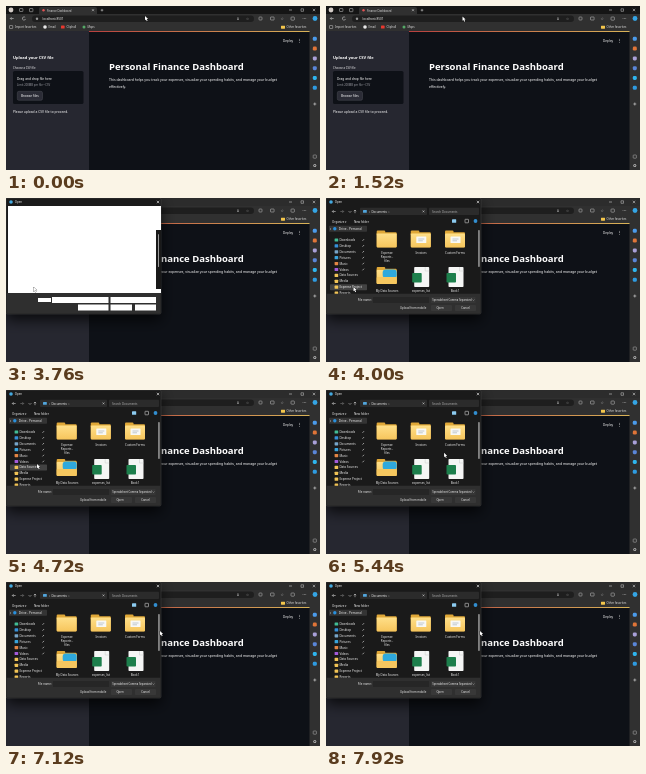
Animation, 314 px wide and 164 px high, one loop 8000 ms. Source, as an HTML page with a canvas:

```html
<!DOCTYPE html>
<html lang="en">
<head>
<meta charset="utf-8">
<title>Personal Finance Dashboard</title>
<style>
html, body { margin: 0; width: 100%; height: 100%; overflow: hidden; background: #0e1117; }
canvas { display: block; width: 314px; height: 164px; }
</style>
</head>
<body>
<canvas id="stage"></canvas>
<script>
const W = 314, H = 164, LOOP = 8000;
const canvas = document.getElementById('stage');
const ctx = canvas.getContext('2d');
const dpr = window.devicePixelRatio || 1;
canvas.width = W * dpr;
canvas.height = H * dpr;

function rect(x, y, w, h, fill, radius = 0, stroke) {
  ctx.beginPath();
  ctx.roundRect(x, y, w, h, radius);
  if (fill) { ctx.fillStyle = fill; ctx.fill(); }
  if (stroke) { ctx.strokeStyle = stroke; ctx.lineWidth = 0.5; ctx.stroke(); }
}

function dot(x, y, r, fill) {
  ctx.beginPath();
  ctx.arc(x, y, r, 0, Math.PI * 2);
  ctx.fillStyle = fill;
  ctx.fill();
}

function line(points, color, width = 0.6) {
  ctx.beginPath();
  for (let i = 0; i < points.length; i += 2) ctx.lineTo(points[i], points[i + 1]);
  ctx.strokeStyle = color;
  ctx.lineWidth = width;
  ctx.stroke();
}

function text(str, x, y, size, color = '#fff', weight = 400, align = 'left') {
  ctx.font = `${weight} ${size}px "Noto Sans", sans-serif`;
  ctx.fillStyle = color;
  ctx.textAlign = align;
  ctx.fillText(str, x, y);
}

function cross(x, y, r, color) {
  line([x - r, y - r, x + r, y + r], color);
  line([x - r, y + r, x + r, y - r], color);
}

function plus(x, y, r, color) {
  line([x - r, y, x + r, y], color);
  line([x, y - r, x, y + r], color);
}

function arrow(x, y, dir, color) {
  line([x - 1.7, y, x + 1.7, y], color);
  line([x + dir * 0.3, y - 1.4, x + dir * 1.7, y, x + dir * 0.3, y + 1.4], color);
}

function drawBrowser(active) {
  const ink = '#c8c8c8';
  rect(0, 0, W, 9, active ? '#151515' : '#2c2c2c');
  rect(0, 8, W, 17, '#303030');
  rect(33, 1, 58, 8, '#303030', [2, 2, 0, 0]);
  dot(5, 4, 2.4, '#d5cdc8');
  rect(13.5, 2.5, 3.4, 3, null, 0.5, ink);
  rect(23.5, 2.5, 3.4, 3.2, null, 0.5, ink);
  dot(37.5, 4.3, 1.2, '#e05252');
  text('Finance Dashboard', 41, 5.5, 2.7, '#e0e0e0');
  cross(87, 4.2, 1, ink);
  plus(96, 4.2, 1.3, ink);
  line([283, 4, 286, 4], ink);
  rect(295, 2.8, 2.5, 2.5, null, 0, ink);
  cross(308, 4, 1.2, ink);

  arrow(6, 12.5, -1, ink);
  ctx.beginPath();
  ctx.arc(18, 12.5, 1.6, 0.3, 5.5);
  ctx.strokeStyle = ink;
  ctx.lineWidth = 0.6;
  ctx.stroke();
  rect(26, 9.5, 222, 6.5, '#1e1e1e', 3.2);
  dot(31, 12.7, 1.2, '#9a9a9a');
  text('localhost:8501', 36.5, 13.8, 3.1, '#eee');
  text('A', 231, 14, 3, ink);
  text('☆', 240, 14, 3.4, ink);
  rect(253, 11, 3, 3, null, 0.7, ink);
  rect(264.5, 11, 3.6, 3, null, 0.5, ink);
  text('☆', 274.5, 14.2, 3.8, ink);
  rect(285, 11, 3.4, 3.2, null, 0.7, ink);
  for (const x of [297, 298.4, 299.8]) dot(x, 12.6, 0.45, ink);
  dot(309, 12.5, 2.4, '#35a5e5');

  rect(3.5, 19.5, 3.2, 3, null, 0.4, ink);
  text('Import favorites', 9, 22.2, 2.8, '#ddd');
  dot(39, 21, 1.8, '#e8e8e8');
  text('Email', 42.5, 22.2, 2.8, '#ddd');
  rect(55, 19.6, 3.6, 3, '#e9382f', 0.6);
  text('Cliphall', 60.5, 22.2, 2.8, '#ddd');
  dot(78, 21, 1.5, '#55a967');
  text('Maps', 81.5, 22.2, 2.8, '#ddd');
  rect(275, 19.7, 4, 3, '#f4c64c', 0.4);
  text('Other favorites', 280.5, 22.2, 2.8, '#ddd');
}

function drawRail() {
  rect(303.5, 25, 10.5, 139, '#303030');
  const icons = ['#4b9bea', '#e07538', '#a9a0d8', '#5a86d8', '#2fb5ee', '#2f9be0'];
  icons.forEach((color, i) => rect(306.8, 30.8 + i * 9.8, 4, 4, color, 1.4));
  plus(308.8, 98, 1.5, '#ddd');
  rect(307.2, 149, 3.2, 3.2, null, 0.6, '#bbb');
  dot(308.8, 159.5, 1.5, '#bbb');
  dot(308.8, 159.5, 0.7, '#303030');
}

function drawPage(inSidebar, hover) {
  rect(0, 25, 304, 139, '#0e1117');
  const stripe = ctx.createLinearGradient(83, 0, 304, 0);
  stripe.addColorStop(0, '#b8403f');
  stripe.addColorStop(1, '#d9b458');
  rect(83, 25, 221, 0.9, stripe);
  rect(0, 25, 83, 139, '#262730');
  if (inSidebar) line([73.6, 33, 72.3, 34.5, 73.6, 36], '#c9c9ce', 0.5);

  text('Upload your CSV file', 7, 53, 4.05, '#fff', 600);
  text('Choose a CSV file', 7, 62.6, 2.8, '#f0f0f2');
  rect(7, 65, 70.5, 33, '#0e1117', 1.6);
  text('Drag and drop file here', 11, 73.7, 3.2, '#fff', 500);
  text('Limit 200MB per file • CSV', 11, 79.6, 2.75, '#9b9ca3');
  rect(11.3, 85.3, 25.2, 9, '#2b2c36', 1.6, hover ? '#ff4b4b' : '#4b4c55');
  text('Browse files', 23.9, 91, 3.2, hover ? '#ff4b4b' : '#fff', 500, 'center');
  text('Please upload a CSV file to proceed.', 7, 107, 3.3);

  text('Deploy', 277, 35.8, 3.1, '#fff', 500);
  for (const y of [33.2, 34.7, 36.2]) dot(293.5, y, 0.42, '#fff');
  text('Personal Finance Dashboard', 103, 64, 9.5, '#fff', 700);
  text('This dashboard helps you track your expenses, visualize your spending habits, and manage your budget',
    103, 74.6, 3.45, '#fff', 500);
  text('effectively.', 103, 81.8, 3.45, '#fff', 500);
}

function drawFrame() {
  ctx.save();
  ctx.shadowColor = 'rgba(0, 0, 0, 0.75)';
  ctx.shadowBlur = 14 * dpr;
  ctx.shadowOffsetY = 6 * dpr;
  rect(0, 0, 155, 116, '#1a1a1a', 1.5);
  ctx.restore();
  rect(0, 0, 155, 116, null, 1.5, '#4a4a4a');
  dot(5, 4, 1.8, '#45a9df');
  text('Open', 8.7, 5.2, 2.9, '#eee');
  cross(152, 4, 1.2, '#eee');
}

function drawBlankDialog() {
  drawFrame();
  rect(2, 8, 153, 87, '#fff');
  rect(150, 32, 5, 59, '#191919');
  rect(152, 36, 1, 33, '#9a9a9a', 0.5);
  rect(0.5, 95, 154, 20.5, '#2f2f2f', [0, 0, 1.3, 1.3]);
  rect(32, 100, 13, 4, '#fff');
  rect(46, 99, 56.5, 6, '#fff');
  rect(104.5, 99, 45.5, 6, '#fff');
  for (const [x, w] of [[72, 30.5], [104.5, 21.5], [129, 21]]) rect(x, 106.5, w, 6, '#fff');
}

// Folder, 20 wide, centred on (x, y); paper and picture are optional contents
function drawFolder(x, y, content) {
  const face = ctx.createLinearGradient(0, y - 6, 0, y + 8.5);
  face.addColorStop(0, '#ffe08a');
  face.addColorStop(1, '#f6c55c');
  rect(x - 10, y - 8.5, 8.5, 5, '#e0a838', 1);
  rect(x - 10, y - 6.8, 20, 15, '#e0a838', 1);
  rect(x - 10, y - 5.5, 20, 14, face, 1);
  if (content === 'paper') {
    rect(x - 4.5, y - 2.5, 10, 6.5, '#f8f8f5', 0.5);
    line([x - 2.5, y, x + 3.5, y], '#a9b4bd', 0.7);
    line([x - 2.5, y + 1.8, x + 2, y + 1.8], '#a9b4bd', 0.7);
  }
  if (content === 'picture') {
    rect(x - 4, y - 6, 14, 8.5, '#2fa9dc', 3);
    rect(x - 10, y + 1.5, 20, 7, '#f6c75f', 1);
  }
}

function drawSheet(x, y) {
  rect(x - 6.5, y - 10, 15, 20, '#f5f6f5', 0.8);
  line([x + 4.5, y - 10, x + 4.5, y - 6, x + 8.5, y - 6], '#c9cdca', 0.5);
  rect(x - 8.5, y - 4, 9.5, 9.5, '#1d7f4c', 0.8);
}

function drawDialog(hoverItem) {
  const ink = '#d0d0d0';
  drawFrame();
  arrow(8, 13.5, -1, ink);
  arrow(16, 13.5, 1, '#777');
  line([22.5, 13, 24, 14.5, 25.5, 13], ink, 0.5);
  line([29, 15.2, 29, 12], ink);
  line([27.8, 13.2, 29, 12, 30.2, 13.2], ink);
  rect(34, 9.8, 67, 7.2, '#2b2b2b', 1);
  rect(37, 12, 3.8, 2.8, '#51a5dc', 0.5);
  text('›  Documents  ›', 43, 14.6, 2.9, '#eee');
  cross(97.5, 13.4, 0.9, ink);
  rect(103, 9.8, 50, 7.2, '#2b2b2b', 1);
  text('Search Documents', 106, 14.6, 2.9, '#aaa');
  text('Organize ▾', 6, 24.5, 2.9, '#eee');
  text('New folder', 28, 24.5, 2.9, '#eee');
  rect(126, 21.3, 4.2, 3.5, '#8ccbf0', 0.4);
  rect(139, 21.3, 3.5, 3.5, null, 0.4, '#eee');
  dot(149.5, 23, 1.9, '#328ed0');

  rect(3, 27.8, 38, 6, '#343434', 0.8);
  line([4, 30, 5, 31, 4, 32], ink, 0.4);
  dot(8.8, 30.8, 1.7, '#2990dd');
  text('Drive - Personal', 12.8, 31.9, 3.1, '#eee');
  const places = ['Downloads', 'Desktop', 'Documents', 'Pictures', 'Music', 'Videos', 'Data Sources', 'Media', 'Expense Project', 'Reports'];
  const colors = ['#42bc94', '#3690d8', '#78a5c8', '#3aa4dc', '#e48645', '#a45bdc'];
  places.forEach((name, i) => {
    const y = 42 + i * 5.9;
    if (i === hoverItem) rect(4, y - 3, 37, 6, '#424242', 0.7);
    rect(8.6, y - 1.6, 3.6, 3.2, colors[i] || '#f0c356', 0.6);
    text(name, 13.4, y + 1, 3, '#eee');
    if (i < 6) line([36.5, y + 0.8, 38, y - 0.8], '#bbb', 0.8);
  });

  drawFolder(60.7, 41);
  drawFolder(94.8, 41, 'paper');
  drawFolder(129, 41, 'paper');
  drawFolder(60.7, 77.5, 'picture');
  drawSheet(94.7, 79);
  drawSheet(129, 79);
  const labels = [['Expense', 61, 56], ['Reports -', 61, 60], ['files', 61, 64],
    ['Invoices', 95, 56], ['Custom Forms', 129, 56],
    ['My Data Sources', 61, 94], ['expenses_list', 95, 94], ['Book1', 129, 94]];
  for (const [label, x, y] of labels) text(label, x, y, 2.9, '#eee', 400, 'center');
  rect(152.2, 32, 1.5, 37, '#9b9b9b', 0.7);

  rect(0.5, 95.8, 154, 19.7, '#2f2f2f', [0, 0, 1.3, 1.3]);
  text('File name:', 31.8, 103, 2.9, '#eee');
  rect(47, 99, 56, 6, '#262626', 0.6);
  rect(105, 99, 44.5, 6, '#363636', 0.6);
  text('Spreadsheet Comma Separated', 106.3, 103, 2.65, '#eee');
  line([146.5, 101.5, 147.5, 102.5, 148.5, 101.5], ink, 0.4);
  text('Upload from mobile', 74, 111, 2.8, '#eee');
  rect(105, 107, 21, 6, '#383838', 0.7);
  text('Open', 114, 111, 2.8, '#eee', 400, 'center');
  rect(129, 107, 21, 6, '#383838', 0.7);
  text('Cancel', 139.5, 111, 2.8, '#eee', 400, 'center');
}

// Cursor stops: time, x, y
const path = [
  [0, 139, 10], [320, 139, 10], [720, 136.5, 10.5], [1760, 136.5, 10.5],
  [2160, 28, 88], [3520, 28, 88], [3680, 27.5, 89], [4320, 27.5, 89],
  [4720, 31, 74], [5120, 50, 70], [5520, 126, 62], [5760, 126, 62],
  [6320, 154.5, 49.5], [6640, 154.5, 49.5], [6800, 154, 49], [LOOP, 154, 49]
];

function cursorAt(t) {
  const i = path.findIndex(stop => stop[0] > t);
  const [t0, x0, y0] = path[i - 1], [t1, x1, y1] = path[i];
  const p = (t - t0) / (t1 - t0), k = p * p * (3 - 2 * p);
  return [x0 + (x1 - x0) * k, y0 + (y1 - y0) * k];
}

function drawCursor(x, y, hand) {
  ctx.save();
  ctx.translate(x, y);
  const shape = new Path2D(hand
    ? 'M0 0q.6-.5 1 0v2l2 .6v1.8l-.7 1.2h-2.2L-1 3.4l.4-.5.6.4z'
    : 'M0 0v4.3l1-.9.8 1.8.8-.4-.8-1.7h1.3z');
  ctx.fillStyle = '#fff';
  ctx.strokeStyle = '#111';
  ctx.lineWidth = 0.5;
  ctx.stroke(shape);
  ctx.fill(shape);
  ctx.restore();
}

function draw(now) {
  const t = Math.floor((now % LOOP) / 80) * 80;
  const [x, y] = cursorAt(t);
  const open = t >= 3760;
  const hover = !open && x > 11 && x < 37 && y > 85 && y < 95;
  ctx.setTransform(dpr, 0, 0, dpr, 0, 0);
  drawPage(!open && x < 83 && y > 26, hover);
  drawBrowser(!open);
  drawRail();
  if (open && t < 3840) drawBlankDialog();
  else if (open) drawDialog(x < 41 ? Math.round((y - 41.5) / 5.9) : -1);
  drawCursor(x, y, hover);
  requestAnimationFrame(draw);
}
requestAnimationFrame(draw);
</script>
</body>
</html>
```
